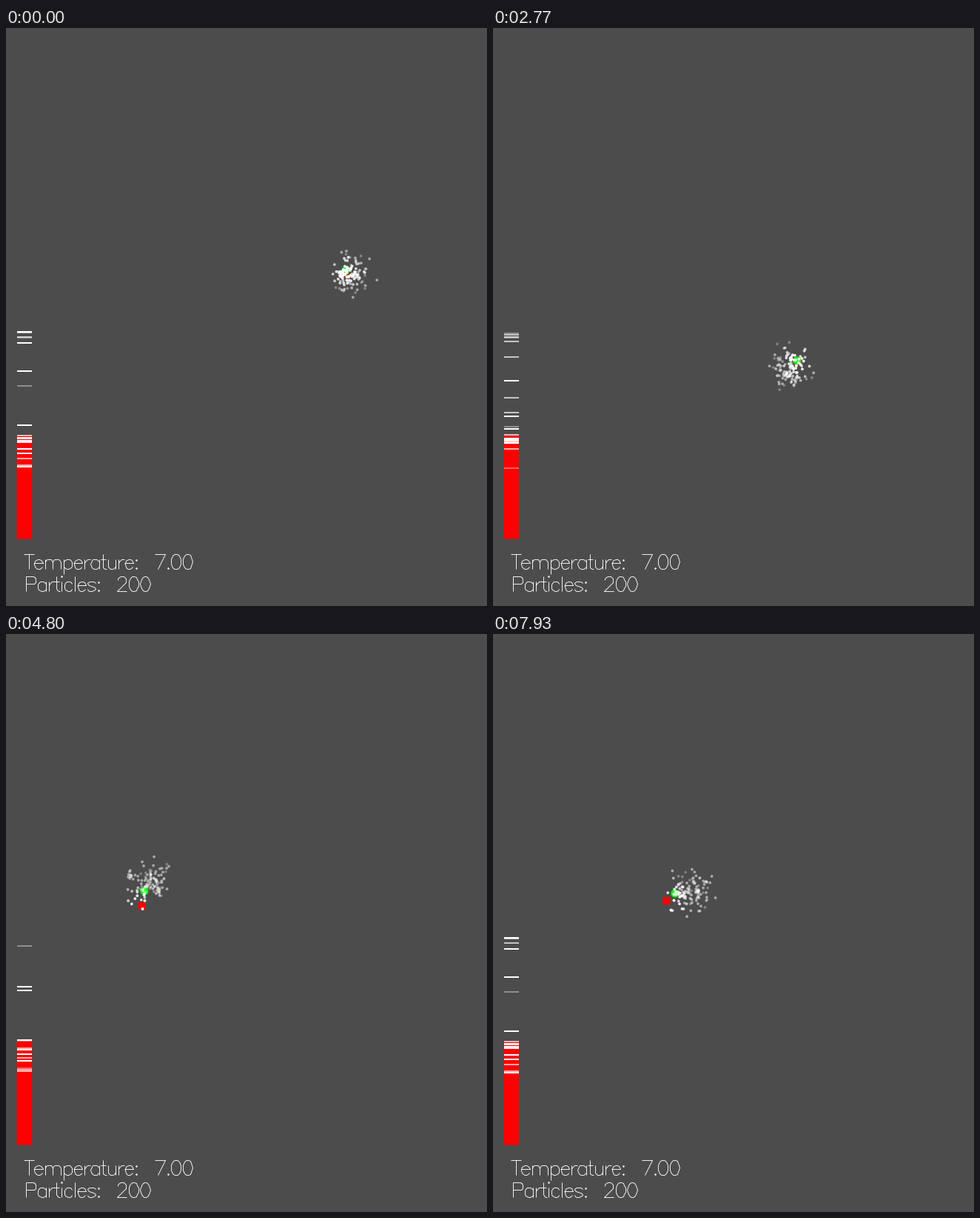
A matplotlib script that plays this animation: 650x780 px, repeating every 8000 ms.

```python
import numpy as np
import matplotlib.pyplot as plt
from matplotlib.animation import FuncAnimation
from matplotlib.collections import LineCollection
from matplotlib.patches import Circle, Rectangle

W, H, DPI = 650, 780, 100
LOOP, TICK = 8000, 20
PX = 72 / DPI
BG = "#4c4c4c"
N = 200
TEMPERATURE = 7.0

# runs of evenly spaced updates: first, last, count
RUNS = [(0, 0, 1), (230, 500, 2), (830, 1770, 8), (1900, 2770, 10),
        (2800, 2900, 2), (3030, 4030, 11), (4170, 4800, 6), (4900, 5100, 3),
        (5270, 6200, 7), (6230, 7370, 11), (7470, 7930, 5)]
STEPS = np.concatenate([np.linspace(*run) for run in RUNS]).round(-1)

# time, x, y of the tracked body
PATH = np.array([
    (0, 459, 327), (500, 413, 258), (1080, 270, 182), (1550, 195, 345),
    (1770, 227, 440), (2300, 340, 495), (2770, 411, 449), (3250, 472, 372),
    (4030, 363, 298), (4800, 187, 347), (5350, 215, 475), (6200, 378, 438),
    (6850, 462, 370), (7350, 410, 325), (7930, 246, 350),
], float)


def position(t):
    """Smooth curve through the path's points."""
    kt, kp = PATH[:, 0], PATH[:, 1:]
    slope = np.gradient(kp, kt, axis=0)
    i = np.clip(np.searchsorted(kt, t, side="right") - 1, 0, len(kt) - 2)
    h = (kt[i + 1] - kt[i])[:, None]
    u = (t - kt[i])[:, None] / h
    return ((1 + 2 * u) * (1 - u) ** 2 * kp[i] + u * (1 - u) ** 2 * h * slope[i]
            + u * u * (3 - 2 * u) * kp[i + 1] + u * u * (u - 1) * h * slope[i + 1])


# ---------------------------------------------------------------- filter
def build_clouds(rng, spread=13.5, keep=0.6, distinct=115, delay=70):
    """Body, noisy measurement and weighted particles at every step."""
    body = position(STEPS)
    speed = (position(STEPS + 1) - position(STEPS - 1)) / 2
    sensor = body + rng.normal(0, 13, body.shape).clip(-26, 26)
    centre = body - delay * speed

    off = rng.normal(0, spread, (distinct, 2))
    clouds = []
    for c, s in zip(centre, sensor):
        off = keep * off + rng.normal(0, spread * (1 - keep ** 2) ** 0.5, off.shape)
        reach = np.hypot(*off.T)[:, None]
        spots = c + off * np.minimum(1, 36 / reach)
        spots = np.concatenate([spots, spots[:N - distinct]])  # resampled copies
        d = np.hypot(*(spots - s).T)
        alpha = 0.3 + 0.55 * np.exp(-((d - d.min()) / 15) ** 2)
        clouds.append((spots, alpha))
    return body, sensor, clouds


def build_marks(rng, count=80):
    """Gauge marks that live for a while: most near the level, some astray."""
    near = rng.normal(562, 22, count)
    far = rng.uniform(400, 530, count)
    y = np.where(rng.random(count) < 0.65, near, far).round().clip(360, 626)
    alpha = rng.choice((1.0, 0.68, 0.38), count)
    born = rng.uniform(0, LOOP, count)
    life = rng.uniform(300, 3300, count)
    return [(y[on], alpha[on]) for on in ((t - born) % LOOP < life for t in STEPS)]


# ---------------------------------------------------------------- lettering
def arc(cx, cy, rx, ry, a0, a1, n=14):
    a = np.radians(np.linspace(a0, a1, n + 1))
    return list(zip(cx + rx * np.cos(a), cy + ry * np.sin(a)))


def stem(x, top, bottom=0):
    return [(x, top), (x, bottom)]


def dot(x, y):
    return arc(x, y, 1, 1, 90, 450, 4)


def arch(x):
    return arc(x + 5.5, 9, 5.5, 5, 170, 0, 6) + [(x + 11, 0)]


BOWL = arc(9.3, 7, 6.3, 7, 35, 325)

# advance width, strokes; capitals are 21 units high
GLYPHS = {
    " ": (25.6, []),
    "T": (16, [stem(8, 21), [(1, 21), (15, 21)]]),
    "P": (21, [stem(4, 21),
               [(4, 21)] + arc(13, 15.5, 5, 5.5, 90, -90) + [(4, 10)]]),
    "a": (19, [stem(15, 14), BOWL]),
    "c": (18, [BOWL]),
    "e": (18, [[(3, 8)] + arc(9.3, 7, 6, 7, 8, 325)]),
    "i": (8, [dot(4, 21), stem(4, 14)]),
    "l": (8, [stem(4, 21)]),
    "m": (30, [stem(4, 14), arch(4), arch(15)]),
    "p": (19, [stem(4, 14, -7), arc(9.7, 7, 6.3, 7, 145, -145)]),
    "r": (13, [stem(4, 14), arc(11, 7, 7, 7, 172, 82, 5)]),
    "s": (17, [arc(8.5, 10.8, 5.5, 3.2, 10, 230, 8)
               + arc(8.5, 3.5, 5.5, 3.5, 60, -170, 8)]),
    "t": (12, [[(5, 21)] + arc(9, 4, 4, 4, 180, 285, 4), [(2, 14), (9, 14)]]),
    "u": (19, [[(4, 14)] + arc(9.5, 5, 5.5, 5, 180, 350, 7), stem(15, 14)]),
    ":": (10, [dot(5, 13), dot(5, 1)]),
    ".": (10, [dot(5, 1)]),
    "0": (20, [arc(10, 10.5, 7, 10.5, 0, 360, 18)]),
    "2": (20, [arc(10, 15, 6, 6, 170, -35) + [(3, 0), (17, 0)]]),
    "7": (20, [[(3, 21), (17, 21), (7, 0)]]),
}


def lettering(text, x, base, unit=20 / 21, trim=3.6):
    """Stroke text with its points on pixel centres."""
    lines = []
    for ch in text:
        width, strokes = GLYPHS[ch]
        for s in strokes:
            p = np.array(s, float)
            xy = np.stack([x + (p[:, 0] - trim / 2) * unit, base - p[:, 1] * unit], 1)
            lines.append(np.floor(xy) + 0.5)
        x += (width - trim) * unit
    return lines


# ---------------------------------------------------------------- stage
rng = np.random.default_rng(7)
body, sensor, clouds = build_clouds(rng)
marks = build_marks(rng)

fig = plt.figure(figsize=(W / DPI, H / DPI), dpi=DPI, facecolor=BG)
ax = fig.add_axes([0, 0, 1, 1])
ax.set(xlim=(0, W), ylim=(H, 0))
ax.axis("off")

gauge = TEMPERATURE * 20
ax.add_patch(Rectangle((15, 689.5 - gauge), 20.5, gauge, fc="red", lw=0,
                       snap=False, zorder=1))
ticks = LineCollection([], linewidths=2 * PX, capstyle="butt", zorder=2)
ax.add_collection(ticks)

words = (lettering(f"Temperature: {TEMPERATURE:.2f}", 25.5, 730.5)
         + lettering(f"Particles: {N}", 25.5, 760.5))
ax.add_collection(LineCollection(words, colors="white", linewidths=0.9 * PX,
                                 snap=False, zorder=2))

red = ax.add_patch(Rectangle((0, 0), 10, 10, fc="red", lw=0, zorder=3))
green = ax.add_patch(Circle((0, 0), 5.6, fc="lime", lw=0, zorder=4))
dots = ax.scatter(np.zeros(N), np.zeros(N), s=(3.7 * PX) ** 2, linewidths=0,
                  color="white", zorder=5)


def white(alpha):
    rgba = np.ones((len(alpha), 4))
    rgba[:, 3] = alpha
    return rgba


def draw(frame):
    t = frame * TICK + TICK / 2
    k = np.searchsorted(STEPS, t, side="right") - 1
    red.set_xy(sensor[k] - 5)
    green.center = tuple(body[k])
    spots, alpha = clouds[k]
    dots.set_offsets(spots)
    dots.set_facecolor(white(alpha))
    ys, levels = marks[k]
    ticks.set_segments([[(15, y), (35, y)] for y in ys])
    ticks.set_color(white(levels))
    return red, green, dots, ticks


anim = FuncAnimation(fig, draw, frames=LOOP // TICK, interval=TICK,
                     init_func=lambda: draw(0), repeat=True, repeat_delay=0)
plt.show()
```
